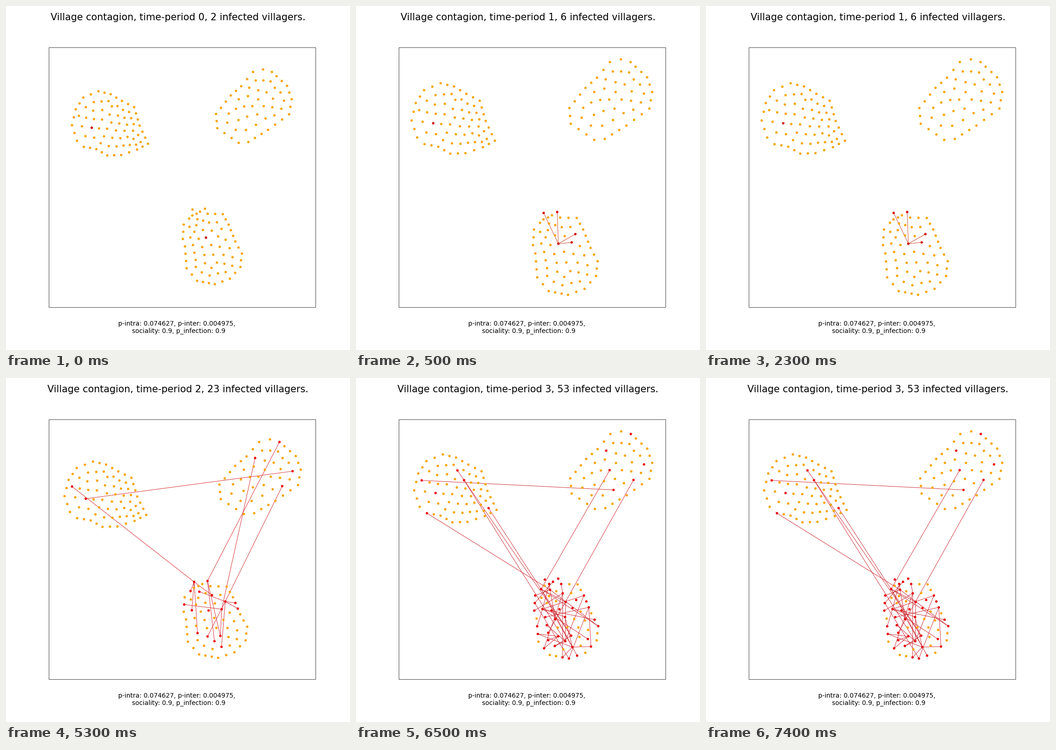
Animation, 748 px wide and 748 px high, one loop 8 s. Source, as a matplotlib script:

```python
import numpy as np
import matplotlib.pyplot as plt
from matplotlib.animation import FuncAnimation
from matplotlib.collections import LineCollection
from matplotlib.patches import Rectangle
from matplotlib.path import Path

SIZE = 748
DPI = 100
TICK = 500
STARTS = [0, 500, 3500, 6500]     # ms at which each period begins
LOOP = 8000
NEVER = 99
DOT = "#f6a60c"
SICK = ["#c80000", "#d40808", "#ea0509", "#e6060c"]
LINK = ["#c8371c", "#c8371c", "#d01c22", "#c81c26"]

# Layout of each period relative to the widest one: (scale, shift) for x and y
FITS = [((.9132, 33.0), (.9120, 32.2)),
        ((1, 0), (1, 0)),
        ((.9819, 8.5), (.9277, 25.9)),
        ((.9895, 6.8), (.9648, 4.1))]

# Each village: population, dot spacing along the edge, outline
WEST = (75, 17, [(121, 249), (130, 211), (148, 183), (184, 168), (213, 175),
                 (240, 191), (269, 206), (282, 250), (302, 293), (276, 307),
                 (238, 320), (205, 321), (179, 306), (149, 300), (133, 286)])
EAST = (57, 21, [(464, 222), (499, 178), (524, 156), (552, 122), (576, 116),
                 (608, 132), (633, 155), (644, 187), (638, 223), (588, 260),
                 (541, 289), (518, 291), (467, 256)])
SOUTH = (69, 17, [(408, 450), (444, 460), (480, 461), (494, 486), (510, 526),
                  (525, 555), (522, 587), (497, 615), (461, 628), (419, 620),
                  (394, 590), (390, 538), (385, 520), (387, 486)])

# Villagers who carry the infection between villages, grouped by period
CARRIERS = np.array([
    (168, 255), (440, 517),
    (408, 450), (437.5, 448), (477, 496), (469, 514),
    (137.5, 226.5), (597, 122), (543, 159.5), (626, 190.5), (603, 225.5),
    (400, 471.5), (419.5, 473), (415.5, 570), (466, 576.5), (453, 589),
    (216, 204), (230.5, 226), (284.5, 289), (149, 300.5), (550.5, 203.5),
    (559, 248), (525.5, 555)])
CARRIER_PERIOD = np.repeat([0, 1, 2, 3], [2, 4, 10, 7])
CONTACTS = [
    [],
    [(1, 2), (1, 3), (1, 4), (1, 5)],
    [(0, 9), (2, 6), (3, 7), (5, 8), (4, 10), (2, 11), (4, 12), (2, 13),
     (3, 14), (3, 15), (5, 14)],
    [(6, 21), (12, 19), (14, 16), (15, 17), (14, 18), (11, 20), (13, 10),
     (11, 22), (12, 22)]]
LOCAL_CASES = {2: 7, 3: 23}       # further cases inside the south village

rng = np.random.default_rng(4)


def distances(a, b):
    return np.linalg.norm(a[:, None] - b[None], axis=2)


def edge_dots(outline, gap):
    dots = []
    for a, b in zip(outline, np.roll(outline, -1, axis=0)):
        steps = max(1, round(np.linalg.norm(b - a) / gap))
        dots += [a + (b - a) * i / steps for i in range(steps)]
    return np.array(dots)


def settle(total, gap, outline, carriers):
    """Fill a village evenly around its carriers; return the other villagers."""
    outline = np.array(outline, float)
    edge = edge_dots(outline, gap)
    edge = edge[distances(edge, carriers).min(axis=1) > 10]
    fixed = np.vstack([carriers, edge])

    low, high = outline.min(axis=0), outline.max(axis=0)
    grid = np.mgrid[low[0]:high[0]:3, low[1]:high[1]:3].reshape(2, -1).T
    grid = grid[Path(outline).contains_points(grid)]
    inner = rng.choice(grid, total - len(fixed), replace=False)
    for _ in range(25):
        owner = distances(grid, np.vstack([inner, fixed])).argmin(axis=1)
        for i in range(len(inner)):
            cell = grid[owner == i]
            if len(cell):
                inner[i] = cell.mean(axis=0)
    return np.vstack([edge, inner])


villages = [WEST, EAST, SOUTH]
centres = np.array([np.mean(v[2], axis=0) for v in villages])
home = distances(CARRIERS, centres).argmin(axis=1)
others = [settle(*v, CARRIERS[home == i]) for i, v in enumerate(villages)]
people = np.vstack([CARRIERS, *others])

# Period in which each villager falls ill
ill = np.full(len(people), NEVER)
ill[:len(CARRIERS)] = CARRIER_PERIOD
south = np.arange(len(people) - len(others[2]), len(people))
southern = np.concatenate([np.flatnonzero(home == 2), south])

contacts = [list(pairs) for pairs in CONTACTS]
for period, cases in LOCAL_CASES.items():
    sources = southern[ill[southern] == period - 1]
    healthy = south[ill[south] == NEVER]
    for case in rng.choice(healthy, cases, replace=False):
        ill[case] = period
        meetings = rng.integers(1, period)
        for source in rng.choice(sources, meetings, replace=False):
            contacts[period].append((source, case))

fig = plt.figure(figsize=(SIZE / DPI, SIZE / DPI), dpi=DPI, facecolor="white")
ax = fig.add_axes([0, 0, 1, 1])
ax.set_xlim(0, SIZE)
ax.set_ylim(SIZE, 0)
ax.axis("off")
ax.add_patch(Rectangle((93.5, 89.8), 579.7, 564.7, fill=False, lw=0.8, ec="#505050"))

links = ax.add_collection(LineCollection([], linewidths=0.65, zorder=2))
dots = ax.scatter(*people.T, s=15, linewidths=0, zorder=3)
title = fig.text(0.5, 0.98, "", size=15, ha="center", va="top")


def caption(x, y, text):
    ax.text(x, y, text, size=10, ha="center", va="baseline")


caption(371.4, 695, "p-intra: 0.074627, p-inter: 0.004975,")
caption(375.6, 710.6, "sociality: 0.9, p_infection: 0.9")


def update(frame):
    period = sum(start <= frame * TICK for start in STARTS) - 1
    scale, shift = np.array(FITS[period]).T
    spots = people * scale + shift
    sick = ill <= period
    dots.set_offsets(spots)
    dots.set_facecolors([SICK[period] if s else DOT for s in sick])
    links.set_segments([spots[list(pair)] for pair in contacts[period]])
    links.set_color(LINK[period])
    title.set_text(f"Village contagion, time-period {period}, {sick.sum()} infected villagers.")
    return links, dots, title


anim = FuncAnimation(fig, update, frames=LOOP // TICK, interval=TICK,
                     repeat=True, repeat_delay=0)
plt.show()
```
